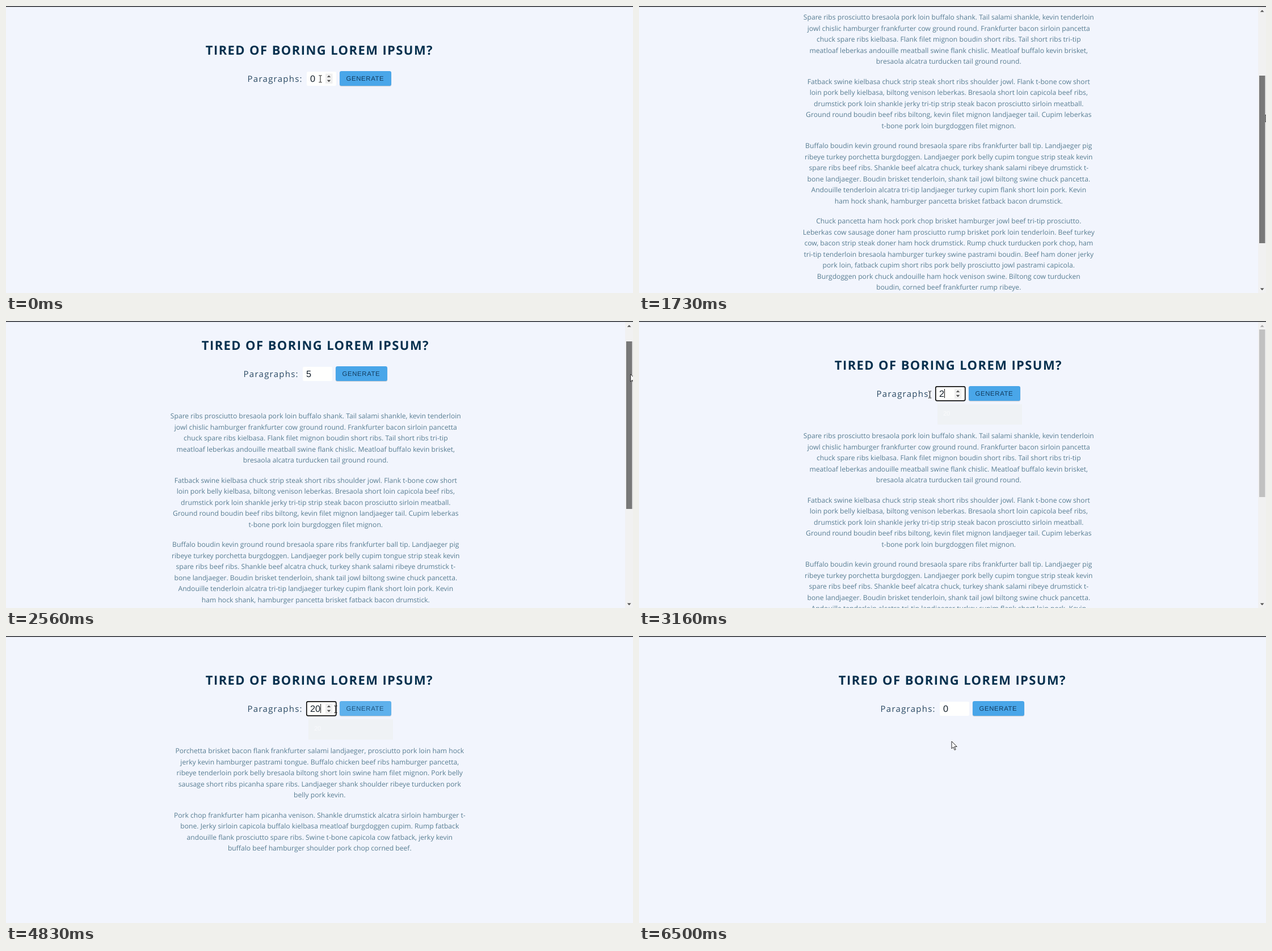
Recreate the animation shown at these times as an HTML page. Size 1105 by 507 pixels, loop 6.56 s.

```html
<!DOCTYPE html>
<html lang="en">
<head>
<meta charset="utf-8">
<title>Lorem generator</title>
<style>
html, body { margin: 0; width: 100%; height: 100%; overflow: hidden; background: #f2f5fd; }
svg { display: block; width: 100%; height: 100%; }
text { font-family: "Open Sans", "Noto Sans", sans-serif; text-rendering: geometricPrecision; white-space: pre; }
.title { font-size: 22px; font-weight: 700; letter-spacing: 1.41px; fill: #06304e; }
.label { font-size: 15px; letter-spacing: 1.25px; fill: #2b4a64; }
.para { font-size: 12.15px; fill: #587d92; text-anchor: middle; }
.num, .btn { font-family: "Liberation Sans", Arial, sans-serif; }
.num { font-size: 16.25px; fill: #14202c; }
.btn { font-size: 11.375px; letter-spacing: .65px; }
</style>
</head>
<body>
<svg viewBox="0 0 1105 507" preserveAspectRatio="none">
  <g id="page">
    <text class="title" x="351.8" y="86">TIRED OF BORING LOREM IPSUM?</text>
    <text class="label" x="425.6" y="134.4">Paragraphs:</text>
    <rect x="530" y="116" width="52" height="25" rx="2.5" fill="#fffffe"/>
    <rect id="ring" x="529.8" y="115.8" width="52" height="25" rx="2.5" fill="none" stroke="#101010" stroke-width="1.7"/>
    <rect id="mark" x="536" y="119" width="9.2" height="18" fill="#0078d7"/>
    <text id="num" class="num" x="536" y="133.8"></text>
    <rect id="caret" y="120" width="1" height="16" fill="#111"/>
    <g id="spin">
      <rect x="563" y="119.5" width="12.5" height="17.5" fill="#efefef"/>
      <path d="M565.8 125.8l3.2-3.4 3.2 3.4zM565.8 130.8l3.2 3.4 3.2-3.4z" fill="#4a4a4a"/>
    </g>
    <rect x="587.6" y="116" width="91.8" height="26.3" rx="3.6" fill="#000" opacity=".08"/>
    <rect x="588" y="115.6" width="91" height="26.2" rx="3.4" fill="#000" opacity=".12"/>
    <rect id="btn" x="588" y="115" width="91" height="26" rx="3.2"/>
    <text id="btnText" class="btn" x="599.5" y="132.1">GENERATE</text>
    <g id="five"></g>
    <g id="two"></g>
    <g id="popup">
      <rect x="533" y="147" width="149" height="36" fill="#eff2f5"/>
      <text class="num" x="543" y="167" style="font-size:11px;fill:#fafbfc">20</text>
    </g>
  </g>
  <g id="bar">
    <rect x="1091.2" y="0" width="14" height="507" fill="#f1f1f1"/>
    <path id="up" d="M1094.8 10.6l3.4-3.6 3.4 3.6z"/>
    <path id="down" d="M1094.8 498.6l3.4 3.6 3.4-3.6z"/>
    <rect id="thumb" x="1093" width="10.5" height="296"/>
  </g>
  <rect width="1105" height="1.4" fill="#15171c"/>
  <g id="cursor">
    <path id="arrow" d="M0 0V13L3 10.2 5.2 15.4 7.2 14.5 5 9.5H9.3Z" fill="#fff" stroke="#111" stroke-width=".9"/>
    <path id="hand" d="M-1.6 .8q1.6-2 3.2 0V6q2-1 3 .6 2-.6 2.4 .8 1.6-.2 1.6 1.6V12q0 2.5-1.5 4.5V18H-1.5V17L-5.6 11q-1.2-2 .5-2.4 1.3-.2 3.5 2Z" fill="#fff" stroke="#111"/>
    <path id="beam" d="M-2.6-6H-.7L0-5.4 .7-6H2.6M0-5.4V5.4M-2.6 6H-.7L0 5.4 .7 6H2.6" fill="none" stroke="#111"/>
  </g>
</svg>
<script>
const LOOP = 6560, LINE = 19.5, GAP = 16, TOP = 207, DEPTH = 310;

const FIVE = `Spare ribs prosciutto bresaola pork loin buffalo shank. Tail salami shankle, kevin tenderloin
jowl chislic hamburger frankfurter cow ground round. Frankfurter bacon sirloin pancetta
chuck spare ribs kielbasa. Flank filet mignon boudin short ribs. Tail short ribs tri-tip
meatloaf leberkas andouille meatball swine flank chislic. Meatloaf buffalo kevin brisket,
bresaola alcatra turducken tail ground round.

Fatback swine kielbasa chuck strip steak short ribs shoulder jowl. Flank t-bone cow short
loin pork belly kielbasa, biltong venison leberkas. Bresaola short loin capicola beef ribs,
drumstick pork loin shankle jerky tri-tip strip steak bacon prosciutto sirloin meatball.
Ground round boudin beef ribs biltong, kevin filet mignon landjaeger tail. Cupim leberkas
t-bone pork loin burgdoggen filet mignon.

Buffalo boudin kevin ground round bresaola spare ribs frankfurter ball tip. Landjaeger pig
ribeye turkey porchetta burgdoggen. Landjaeger pork belly cupim tongue strip steak kevin
spare ribs beef ribs. Shankle beef alcatra chuck, turkey shank salami ribeye drumstick t-
bone landjaeger. Boudin brisket tenderloin, shank tail jowl biltong swine chuck pancetta.
Andouille tenderloin alcatra tri-tip landjaeger turkey cupim flank short loin pork. Kevin
ham hock shank, hamburger pancetta brisket fatback bacon drumstick.

Chuck pancetta ham hock pork chop brisket hamburger jowl beef tri-tip prosciutto.
Leberkas cow sausage doner ham prosciutto rump brisket pork loin tenderloin. Beef turkey
cow, bacon strip steak doner ham hock drumstick. Rump chuck turducken pork chop, ham
tri-tip tenderloin bresaola hamburger turkey swine pastrami boudin. Beef ham doner jerky
pork loin, fatback cupim short ribs pork belly prosciutto jowl pastrami capicola.
Burgdoggen pork chuck andouille ham hock venison swine. Biltong cow turducken
boudin, corned beef frankfurter rump ribeye.

Beef ribs ribeye porchetta, doner burgdoggen drumstick bresaola alcatra sausage. Sausage
jerky shank capicola chuck kielbasa swine tri-tip pork meatloaf. Sirloin shank kevin chuck
drumstick ball tip sausage tenderloin ham hock prosciutto turducken. Pig jerky doner
burgdoggen beef short loin meatloaf short ribs. Salami kevin biltong, swine pig shoulder
meatball fatback.`;

const TWO = `Porchetta brisket bacon flank frankfurter salami landjaeger, prosciutto pork loin ham hock
jerky kevin hamburger pastrami tongue. Buffalo chicken beef ribs hamburger pancetta,
ribeye tenderloin pork belly bresaola biltong short loin swine ham filet mignon. Pork belly
sausage short ribs picanha spare ribs. Landjaeger shank shoulder ribeye turducken pork
belly pork kevin.

Pork chop frankfurter ham picanha venison. Shankle drumstick alcatra sirloin hamburger t-
bone. Jerky sirloin capicola buffalo kielbasa meatloaf burgdoggen cupim. Rump fatback
andouille flank prosciutto spare ribs. Swine t-bone capicola cow fatback, jerky kevin
buffalo beef hamburger shoulder pork chop corned beef.`;

const FIELD = [554, 128.8], SELECT = [511, 130], BUTTON = [648, 129], BAR = [1100, 80];

// Each round: press in the field, drag over the number, type, go to the button
const ROUNDS = [
  { start: 60, span: 520, value: "5" },
  { start: 2890, span: 510, value: "2" },
  { start: 4620, span: 280, value: "20" }
];
const TYPE = .45, LEAVE = .5;

// Where the pointer rests after a round: time, place
const visit = ({ start, span }) => [
  [start, FIELD], [start + span * .25, SELECT], [start + span * LEAVE, SELECT], [start + span, BUTTON]
];
const PATH = [
  ...visit(ROUNDS[0]), [800, BUTTON], [1400, BAR], [2620, BAR], [2760, [604, 95]],
  ...visit(ROUNDS[1]), [3900, BUTTON], [4220, [1098, 250]], [4480, BUTTON],
  ...visit(ROUNDS[2]), [5400, BUTTON], [5850, [648, 230]], [6200, [516, 270]], [6480, [551, 186]]
];

const el = id => document.getElementById(id);
const set = (id, attrs) => { for (const k in attrs) el(id).setAttribute(k, attrs[k]); };
const show = (id, on) => set(id, { visibility: on ? "visible" : "hidden" });
const clamp = k => Math.min(1, Math.max(0, k));
const part = (t, from, to) => clamp((t - from) / (to - from));
const smooth = k => k * k * (3 - 2 * k);
const mix = (a, b, k) => `rgb(${a.map((v, i) => Math.round(v + (b[i] - v) * k))})`;

const isLong = t => t >= 800 && t < 3460;
const shiftAt = t => isLong(t) ? -7 : 0;
const scrollAt = t => Math.round(DEPTH * (t < 2130
  ? 1 - (1 - part(t, 1430, 2050)) ** 1.34
  : 1 - part(t, 2130, 2615)));
const thumbAt = t => Math.round(15.4 + scrollAt(t) * .587);

function pointerAt(t) {
  if (t > 1430 && t < 2615) {
    return [1100 + 7 * scrollAt(t) / DEPTH, thumbAt(t) + (t < 2100 ? 69 : 58)];
  }
  const i = PATH.findIndex(p => p[0] > t);
  if (i < 1) return PATH[i < 0 ? PATH.length - 1 : 0][1];
  const [t0, a] = PATH[i - 1], [t1, b] = PATH[i], k = smooth(part(t, t0, t1));
  return a.map((v, j) => v + (b[j] - v) * k);
}

function over(t, left, right) {
  const [x, y] = pointerAt(t), px = x - shiftAt(t);
  return scrollAt(t) === 0 && y > 114 && y < 142 && px >= left && px < right;
}
const onButton = t => over(t, 588, 680);

// The button's colour fades: share of a short time span spent over it
function hoverAt(t) {
  let sum = 0;
  for (let d = -60; d <= 20; d += 10) sum += onButton(t + d);
  return sum / 9;
}

function valueAt(t) {
  if (t >= 6200) return "0";
  let value = "0";
  for (const r of ROUNDS) {
    const typed = Math.floor((t - r.start - r.span * TYPE) / 25) + 1;
    if (typed > 0) value = r.value.slice(0, typed);
  }
  return value;
}

function fill(id, copy) {
  let y = TOP, out = "";
  for (const line of copy.split("\n")) {
    if (!line) { y += GAP; continue; }
    out += `<text class="para" x="552.8" y="${Math.round(y)}">${line}</text>`;
    y += LINE;
  }
  el(id).innerHTML = out;
}

function draw(t) {
  const long = isLong(t), scroll = scrollAt(t), hover = hoverAt(t), value = valueAt(t);
  set("page", { transform: `translate(${shiftAt(t)} ${long ? -scroll : 0})` });
  show("five", long);
  show("two", t >= 3890 && t < 5480);
  show("bar", long);
  set("thumb", { y: thumbAt(t), fill: t > 1400 && t < 2640 ? "#787878" : "#c1c1c1" });
  set("up", { fill: scroll > 0 ? "#505050" : "#a3a3a3" });
  set("down", { fill: scroll < DEPTH ? "#505050" : "#a3a3a3" });

  const round = ROUNDS.find(r => t >= r.start && t < r.start + r.span);
  const k = round ? (t - round.start) / round.span : 0;
  const mark = k > .12 && k < TYPE;
  el("num").textContent = value;
  el("num").style.fill = mark ? "#fff" : "";
  show("ring", round);
  show("mark", mark);
  show("caret", round && !mark);
  set("caret", { x: 536 + 9.05 * value.length });
  show("spin", round || over(t, 529, 583));
  set("btn", { fill: mix([73, 166, 233], [168, 215, 246], hover) });
  set("btnText", { fill: mix([18, 58, 92], [73, 166, 233], hover) });
  set("popup", { opacity: k > TYPE && value[0] === "2" ? clamp((1 - k) * 4) : 0 });

  const beam = over(t, 505, 588), hand = onButton(t);
  show("beam", beam);
  show("hand", hand);
  show("arrow", !beam && !hand);
  set("cursor", { transform: `translate(${pointerAt(t).join(" ")})` });
}

fill("five", FIVE);
fill("two", TWO);
const start = performance.now();
function tick(now) {
  draw(Math.max(0, now - start) % LOOP);
  requestAnimationFrame(tick);
}
draw(0);
requestAnimationFrame(tick);
</script>
</body>
</html>
```
